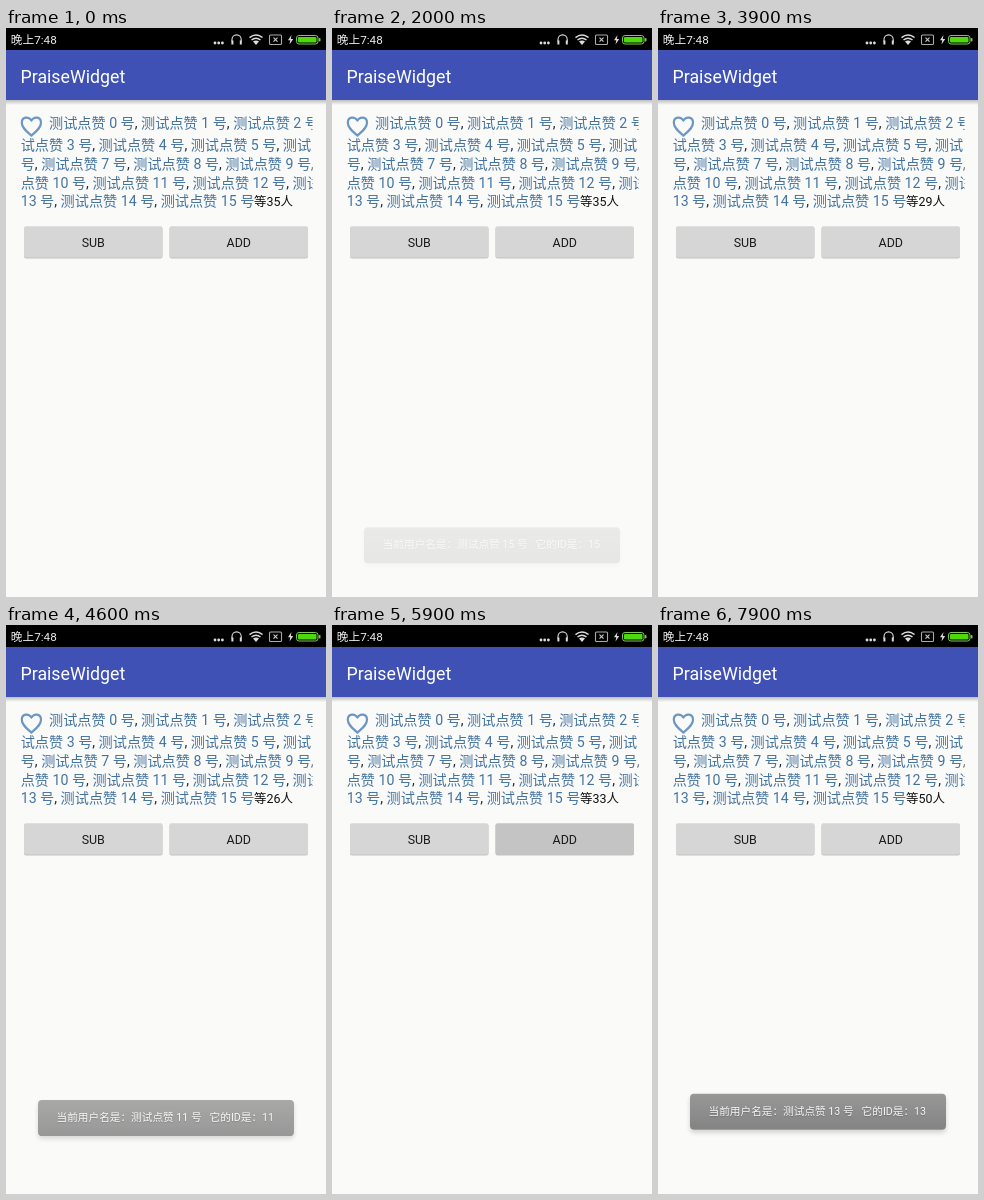
An HTML page that plays this animation: 320x569 px, repeating every 8000 ms.

```html
<!DOCTYPE html>
<html lang="zh">
<head>
<meta charset="utf-8">
<title>PraiseWidget</title>
<style>
html, body { margin: 0; width: 100%; height: 100%; overflow: hidden; background: #fafaf9; }
body { position: relative; font-family: Roboto, "Noto Sans CJK SC", "Noto Sans CJK", sans-serif; }
#screen { position: absolute; left: 0; top: 0; display: block; }
text { white-space: pre; }
.names { font-size: 14.17px; fill: #44739f; }
.names .sep { fill: #1c2a3a; }
#total { font-size: 12.44px; fill: #111; }
.btn text { font-size: 12.44px; text-anchor: middle; fill: #1c1c1c; }
#toast {
  position: absolute; left: 32px; top: 0; width: 255.5px; height: 36px;
  box-sizing: border-box; padding-left: 18.5px; border-radius: 4px;
  background: linear-gradient(#747474, #585858);
  box-shadow: 0 3px 5px rgba(0, 0, 0, .22);
  color: #f6f6f6; font-size: 10.67px; line-height: 35px; white-space: pre;
  text-shadow: 0 1px 1px rgba(0, 0, 0, .4);
  opacity: 0;
}
</style>
</head>
<body>
<svg id="screen" width="320" height="569" viewBox="0 0 320 569">
  <defs>
    <linearGradient id="fade" x2="0" y2="1">
      <stop stop-color="#000" stop-opacity=".24"/>
      <stop offset="1" stop-color="#000" stop-opacity="0"/>
    </linearGradient>
    <clipPath id="clip"><rect x="14" y="80" width="292.5" height="110"/></clipPath>
  </defs>

  <rect width="320" height="22" fill="#000"/>
  <text x="4.8" y="16" font-size="11.7" fill="#eee">晚上7:48</text>
  <g fill="#ddd">
    <circle cx="209" cy="15" r="1.4"/><circle cx="212.7" cy="15" r="1.4"/><circle cx="216.4" cy="15" r="1.4"/>
  </g>
  <g fill="none" stroke="#ddd" stroke-width="1.1">
    <path d="M226 13.5V11.5a4.6 4.6 0 0 1 9.2 0V13.5"/>
    <path d="M226.4 12.5V16.5M234.8 12.5V16.5" stroke-width="2"/>
    <path d="M243.5 9.6Q250 4.4 256.5 9.6M245.5 12Q250 8.4 254.5 12" stroke-width="1.5"/>
    <path d="M247 13.5Q250 11.3 253 13.5L250 17Z" fill="#ddd" stroke="none"/>
    <rect x="263.5" y="7" width="12" height="9.5" rx="1" stroke="#aaa"/>
    <path d="M267.5 9.7l4 4m0-4l-4 4" stroke="#ccc"/>
  </g>
  <path d="M285.5 7l-3.5 5.2h2.3l-.8 4.3 3.7-5.5h-2.4z" fill="#ddd"/>
  <rect x="290.5" y="7.5" width="21.5" height="8.5" rx="2.5" fill="none" stroke="#7fc95c"/>
  <rect x="292" y="9" width="18.5" height="5.5" rx="1" fill="#4fd80c"/>
  <rect x="312.8" y="10" width="1.7" height="3.6" rx=".8" fill="#7fc95c"/>

  <rect y="72" width="320" height="5" fill="url(#fade)"/>
  <rect y="22" width="320" height="50" fill="#3f51b5"/>
  <text x="14.5" y="54.5" font-size="17.78" fill="#fff">PraiseWidget</text>

  <path d="M25.4 107.6C20.7 103.4 15.8 99.8 15.8 94.7C15.8 89 22.4 87.7 25.4 92.5C28.4 87.7 35 89 35 94.7C35 99.8 30.1 103.4 25.4 107.6Z"
    fill="none" stroke="#6c97c4" stroke-width="2.2" stroke-linejoin="round"/>
  <g id="lines" class="names" clip-path="url(#clip)"></g>
  <text id="total" x="248" y="178.3"></text>
  <g id="buttons"></g>
</svg>
<div id="toast"></div>

<script>
const $ = id => document.getElementById(id);
const LOOP = 8000;

const name = n => `测试点赞 ${n} 号`;
const lines = [
  [43, 100.3, [name(0), name(1), name(2)]],
  [14.7, 122.3, ["试点赞 3 号", name(4), name(5), "测试"]],
  [14.7, 141.2, ["号", name(7), name(8), name(9), ""]],
  [14.7, 159.7, ["点赞 10 号", name(11), name(12), "测试点赞"]],
  [14.7, 178.3, ["13 号", name(14), name(15)]]
];
$("lines").innerHTML = lines.map(([x, y, parts]) =>
  `<text x="${x}" y="${y}">${parts.join('<tspan class="sep">, </tspan>')}</text>`).join("");

$("buttons").innerHTML = [["SUB", 18], ["ADD", 163.5]].map(([label, x]) => `<g class="btn">
  <rect x="${x}" y="199" width="138.5" height="31.4" rx="2" fill="#c3c3c3"/>
  <rect id="${label}" x="${x}" y="198.2" width="138.5" height="31.4" rx="2"/>
  <text x="${x + 69.25}" y="219.4">${label}</text></g>`).join("");

// Runs of taps: button, first release, interval, number of taps
const taps = [
  ["SUB", 3240, 120, 9],
  ["ADD", 5140, 125, 7],
  ["ADD", 6190, 93, 7],
  ["ADD", 6825, 72, 10]
].flatMap(([id, first, gap, count]) =>
  Array.from({ length: count }, (_, i) => ({ id, at: first + i * gap })));

const HOLD = 55, RELEASE = 40;
const toasts = [[330, 10], [1955, 15], [4360, 11], [7610, 13]];

const clamp = v => Math.max(0, Math.min(1, v));
const smooth = v => v * v * (3 - 2 * v);

// Rises past its resting place, then settles
function toastY(t) {
  if (t < 290) return 505 - t * 0.124;
  if (t < 420) return 469 - 14 * Math.sin(clamp((t - 290) / 130) * Math.PI / 2);
  return 455 + 9 * smooth(clamp((t - 420) / 280));
}

function drawToast(t) {
  const shown = toasts.filter(([start]) => t >= start).pop();
  const el = $("toast");
  if (!shown) { el.style.opacity = 0; return; }
  const [start, id] = shown, age = t - start;
  const msg = `当前用户名是：${name(id)}   它的ID是：${id}`;
  if (el.textContent !== msg) el.textContent = msg;
  el.style.opacity = clamp(age / 400) * clamp(1 - (age - 900) / 500);
  el.style.transform = `translateY(${toastY(age)}px)`;
}

function drawTaps(t) {
  let total = 35;
  const press = { SUB: 0, ADD: 0 };
  for (const { id, at } of taps) {
    if (t >= at) total += id === "ADD" ? 1 : -1;
    const level = t < at - HOLD ? 0 : clamp(1 - (t - at) / RELEASE);
    press[id] = Math.max(press[id], level);
  }
  for (const id in press) {
    const c = Math.round(214 - 25 * press[id]);
    $(id).setAttribute("fill", `rgb(${c},${c},${c})`);
  }
  const text = `等${total}人`;
  if ($("total").textContent !== text) $("total").textContent = text;
}

const origin = performance.now();
function frame() {
  const t = (performance.now() - origin) % LOOP;
  drawTaps(t);
  drawToast(t);
  requestAnimationFrame(frame);
}
frame();
</script>
</body>
</html>
```
